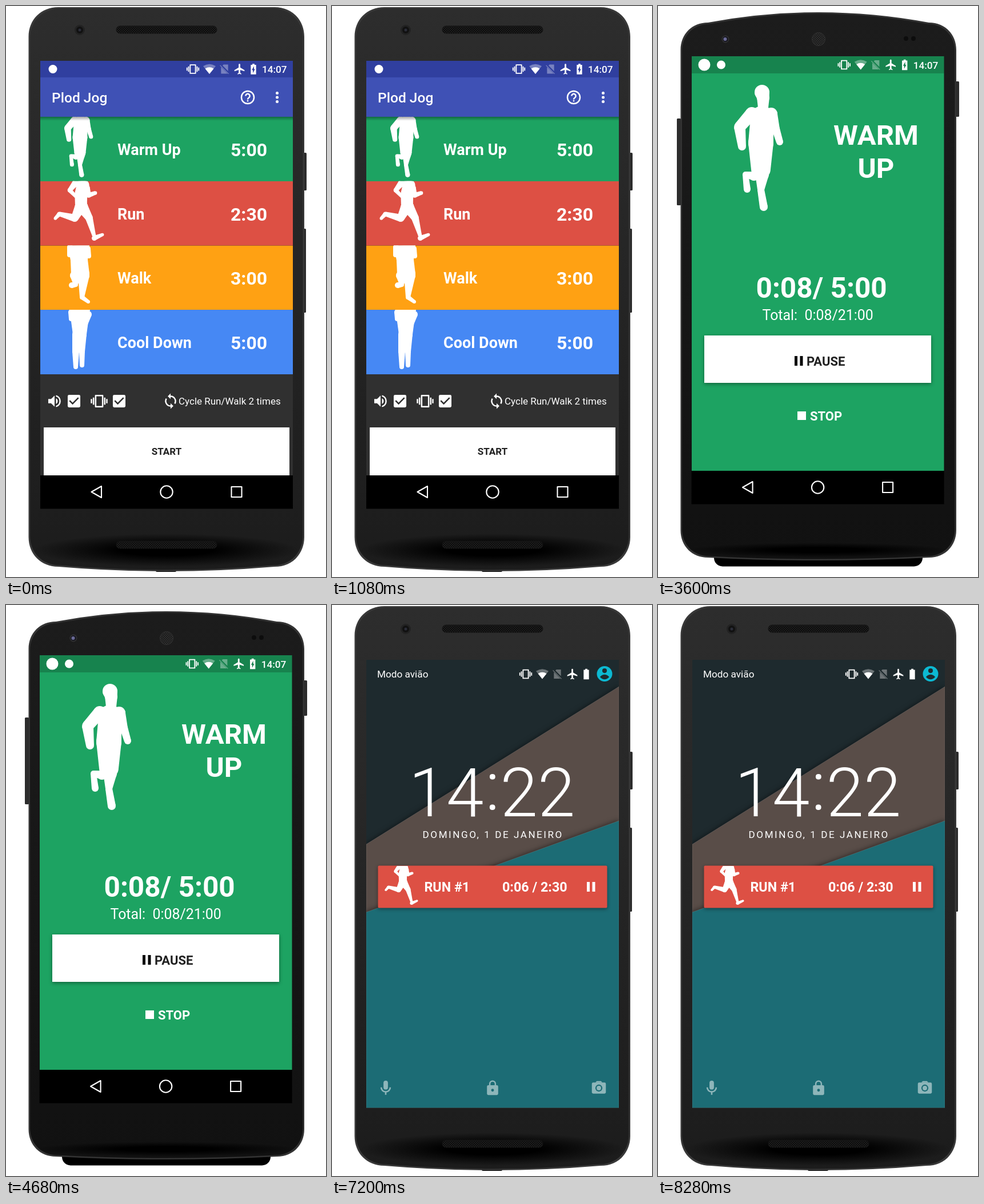
These frames come from a looping animation (560 by 1000 pixels, 9000 ms). An HTML page:

```html
<!DOCTYPE html>
<html lang="en">
<head>
<meta charset="utf-8">
<title>Interval timer screens</title>
<style>
  html, body { margin: 0; width: 100%; height: 100%; overflow: hidden; background: #fff; }
  #stage { display: block; width: 560px; height: 1000px; }
  text { font-family: Roboto, sans-serif; white-space: pre; }
  .lift { filter: drop-shadow(0 2px 3px rgba(0, 0, 0, .4)); }
  .cast { filter: drop-shadow(0 -1px 4px rgba(0, 0, 0, .5)); stroke: #fff; stroke-opacity: .12; }
</style>
</head>
<body>
<svg id="stage" viewBox="0 0 560 1000"></svg>
<script>
const SCENE_MS = 1800;
const GREEN = '#1da362', RED = '#dd5044', ORANGE = '#ffa113', BLUE = '#4688f4';
const PANEL = '#303030', NIGHT = '#1e2a2e', TEAL = '#1c6c75', INK = '#212121';
const DP = 1.226;

const rect = (x, y, w, h, fill, more = '') =>
  `<rect x="${x}" y="${y}" width="${w}" height="${h}" fill="${fill}" ${more}/>`;
const circle = (x, y, r, fill, more = '') => `<circle cx="${x}" cy="${y}" r="${r}" fill="${fill}" ${more}/>`;
const path = (d, fill, more = '') => `<path d="${d}" fill="${fill}" ${more}/>`;
const group = (transform, content, more = '') => `<g transform="${transform}" ${more}>${content}</g>`;
const move = (x, y, content) => group(`translate(${x} ${y})`, content);
const text = (x, y, size, weight, string, fill = '#fff', more = '') =>
  `<text x="${x}" y="${y}" font-size="${size}" font-weight="${weight}" fill="${fill}" ${more}>${string}</text>`;
const centred = (x, y, size, weight, string, fill) =>
  text(x, y, size, weight, string, fill, 'text-anchor="middle"');
const clipped = (x, y, w, h, content) =>
  `<svg x="${x}" y="${y}" width="${w}" height="${h}" viewBox="${x} ${y} ${w} ${h}">${content}</svg>`;

// Icons on a 24 x 24 grid, drawn in the group's colour
const solid = d => `<path d="${d}" stroke="none"/>`;
const line = (d, width = 2, more = '') => `<path d="${d}" fill="none" stroke-width="${width}" ${more}/>`;
const box = (x, y, w, h) => `<rect x="${x}" y="${y}" width="${w}" height="${h}" rx="2" stroke="none"/>`;
const dot = (x, y, r) => `<circle cx="${x}" cy="${y}" r="${r}" stroke="none"/>`;
const hole = (x, y, r, fill) => circle(x, y, r, fill, 'stroke="none"');

const ICONS = {
  volume: solid('M3 9h4l5-5v16l-5-5H3zM14 8a4.500 4.500 0 0 1 0 8z') + line('M14 4.300a8 8 0 0 1 0 15.400'),
  check: box(3, 3, 18, 18) + line('M5.700 11.300L10 15.600 18.300 7.300', 2, `stroke="${PANEL}"`),
  vibrate: line('M1 9v6M4 7v10M20 7v10M23 9v6M7 4h10v16H7z', 2, 'stroke-linejoin="round"'),
  cycle: line('M12 5a7 7 0 0 1 6 10.500M12 19a7 7 0 0 1-6-10.500') + solid('M12 1v8l-4-4zM12 23v-8l4 4z'),
  help: line('M3 12a9 9 0 0 1 18 0 9 9 0 0 1-18 0M9 10a3 3 0 1 1 4.500 2.600Q12 13.500 12 15') + solid('M11 16h2v2h-2z'),
  plane: solid('M21 16l-8-2.500V19l2 1.500V22l-3.500-1L8 22v-1.500l2-1.500v-5.500L2 16v-2l8-5V3.500a1.500 1.500 0 0 1 3 0V9l8 5z'),
  battery: solid('M7 4h3V2h4v2h3v18H7z'),
  bolt: solid('M11 20v-5.500H9L13 7v5.500h2z'),
  noSim: solid('M10 3h9v13L8 5zM5 8l13 13H5z') + line('M3 4.500L20 21.500', 1.5),
  account: dot(12, 12, 10) + hole(12, 8, 3, NIGHT) + path('M6 16q6-6 12 0-6 6.500-12 0z', NIGHT, 'stroke="none"'),
  mic: line('M12 5v6', 6, 'stroke-linecap="round"') + line('M5.900 11a6.100 6.100 0 0 0 12.200 0M12 17v4'),
  lock: box(4, 8, 16, 14) + line('M8 9V6a4 4 0 0 1 8 0v3') + hole(12, 15, 2, TEAL),
  camera: box(2, 4, 20, 16) + solid('M7 4l2-2h6l2 2z') + hole(12, 12, 5, TEAL) + dot(12, 12, 3.2)
};
const icon = (name, x, y, scale = DP, color = '#fff', more = '') =>
  group(`translate(${x} ${y}) scale(${scale}) translate(-12 -12)`, ICONS[name], `fill="${color}" stroke="${color}" ${more}`);

// A tapered limb through joints [x, y, radius]
const limb = (...joints) => joints.map(([x, y, r], i) => {
  if (!i) return circle(x, y, r, '#fff');
  const [px, py, pr] = joints[i - 1];
  const angle = Math.atan2(y - py, x - px);
  const nx = -Math.sin(angle), ny = Math.cos(angle);
  return circle(x, y, r, '#fff') + path(`M${px + nx * pr} ${py + ny * pr}L${x + nx * r} ${y + ny * r}` +
    `L${x - nx * r} ${y - ny * r}L${px - nx * pr} ${py - ny * pr}Z`, '#fff');
}).join('');

const FIGURES = {
  jog: limb([182, 151, 13], [184, 160, 11], [184, 178, 9]) +
    limb([182, 195, 20], [180, 240, 22], [180, 286, 17]) +
    limb([164, 188, 11], [143, 212, 10], [147, 246, 7]) +
    limb([198, 189, 11], [206, 215, 7], [213, 238, 6]) +
    limb([182, 295, 12], [180, 322, 6], [185, 352, 7]) +
    limb([168, 298, 8], [153, 295, 5], [156, 321, 6]),
  run: limb([194, 148, 14], [197, 154, 12], [188, 176, 10]) +
    limb([190, 188, 20], [184, 215, 20], [184, 247, 19]) +
    limb([168, 178, 11], [148, 203, 7], [168, 224, 5]) +
    limb([203, 195, 9], [208, 219, 8], [229, 212, 6]) +
    limb([187, 256, 19], [209, 290, 12], [225, 346, 6]) + limb([226, 356, 8], [252, 345, 5]) +
    limb([182, 256, 18], [164, 292, 12], [115, 279, 7], [102, 293, 5]),
  walk: limb([127, 419, 19], [128, 445, 15], [130, 470, 16]) +
    limb([112, 422, 5], [111, 436, 4]) + limb([144, 425, 4], [145, 438, 4]) +
    limb([136, 472, 10], [133, 510, 4], [144, 518, 3]) +
    limb([121, 472, 9], [122, 488, 4], [115, 489, 5]),
  cool: limb([129, 530, 18], [129, 575, 12]) +
    limb([114, 536, 5], [114, 548, 4]) + limb([144, 540, 6], [139, 557, 4]) +
    limb([124, 575, 8], [122, 605, 6], [122, 632, 4]) +
    limb([133, 575, 8], [133, 605, 5], [133, 629, 4])
};
const figure = (name, x = 0, y = 0, scale = 1) => group(`translate(${x} ${y}) scale(${scale})`, FIGURES[name]);

const gradient = (id, from, to) => `<linearGradient id="${id}" x2="0" y2="1">
  <stop stop-color="${from}"/><stop offset="1" stop-color="${to}"/></linearGradient>`;
const defs = `<defs>
  ${gradient('bodyA', '#2d2d2d', '#1c1c1c') + gradient('bodyB', '#1c1c1c', '#111')}
  ${gradient('shade', 'rgba(0,0,0,.35)', 'rgba(0,0,0,0)')}
  <radialGradient id="dusk"><stop offset=".35"/><stop offset="1" stop-opacity="0"/></radialGradient>
  <pattern id="mesh" width="4" height="4" patternUnits="userSpaceOnUse">${circle(1, 1, 1, '#333') + circle(3, 3, 1, '#333')}</pattern>
</defs>`;

// Rounded phone outline whose top and bottom edges bow outwards
const outline = (top, bottom, corner, bowTop, bowBottom, inset) => {
  const l = 39.5 + inset, r = 522 - inset, t = top + inset, b = bottom - inset, k = corner * .42;
  return `M${l} ${t + corner}C${l} ${t + k} ${l + k} ${t} ${l + corner} ${t}Q281 ${t - 2 * bowTop} ${r - corner} ${t}` +
    `C${r - k} ${t} ${r} ${t + k} ${r} ${t + corner}V${b - corner}C${r} ${b - k} ${r - k} ${b} ${r - corner} ${b}` +
    `Q281 ${b + 2 * bowBottom} ${l + corner} ${b}C${l + k} ${b} ${l} ${b - k} ${l} ${b - corner}Z`;
};
const body = (fill, rim, ...shape) => path(outline(...shape, 0), rim) + path(outline(...shape, 2.5), fill) +
  `<ellipse cx="281" cy="953" rx="232" ry="${shape[1] - 953}" fill="url(#dusk)"/>`;
const grille = y => rect(193, y, 176, 13, '#0c0c0c', 'rx="6.5" stroke="#111"') +
  rect(193, y, 176, 13, 'url(#mesh)', 'rx="6.5" opacity=".55"');
const sideKey = (x, y, h) => rect(x, y, 7, h, '#2c2c2c', 'rx="1.5"');

const phoneA = sideKey(519, 257, 66) + sideKey(518, 390, 147) + rect(262, 986, 36, 5, '#000', 'rx="2"') +
  body('url(#bodyA)', '#383838', 2, 982, 52, 0, 8) +
  circle(129, 42, 9, '#222') + circle(129, 42, 6, '#111') + circle(129, 42, 2.5, '#2b2d38') +
  grille(35) + grille(937);

const phoneB = sideKey(33, 197, 152) + sideKey(520, 132, 62) +
  rect(98, 950, 365, 31.5, '#000', 'rx="15"') +
  body('url(#bodyB)', '#333', 29, 966, 48, 18, 5) +
  circle(118, 58, 6.5, '#333') + circle(118, 58, 5, '#171720') + circle(117.5, 58, 3, '#6a6a96') +
  circle(281, 58, 11.5, '#1b1b1b') + circle(281, 58, 11.5, 'url(#mesh)', 'stroke="#333"') +
  circle(434, 57, 4, '#0d0d0d') + circle(447, 57, 4, '#0d0d0d');

const fan = (size, more) =>
  path(`M356 119l${-size} ${-size * 1.25}q${size} ${-size * .65} ${size * 2} 0z`, '#fff', more);
const statusIcons = boltColor =>
  icon('vibrate', 327, 110.5, .93) + fan(11, 'opacity=".35"') + fan(7.5) +
  icon('noSim', 382.5, 110.5, .88, '#fff', 'opacity=".35"') +
  icon('plane', 409, 110.5, .93) + icon('battery', 433, 110.5, .93) +
  (boltColor ? icon('bolt', 433, 110, .93, boltColor) : '');
const clock = time => text(448, 117, 17.2, 500, time);

const navigation = rect(60, 822, 442, 58.5, '#000') +
  `<g fill="none" stroke="#fff" stroke-width="2.1" stroke-linejoin="round">
    <path d="M167 841v20l-17.500-10zM394.500 842h18v18h-18z"/><circle cx="281" cy="851" r="10.700"/>
  </g>`;

const pauseBars = (x, y, color) => [0, 9.5].map(dx => rect(x + dx, y, 5, 17, color)).join('');

const rows = [
  ['Warm Up', '5:00', GREEN, figure('jog', 24, 89.6, .586)],
  ['Run', '2:30', RED, figure('run', 30.3, 211.1, .549)],
  ['Walk', '3:00', ORANGE, figure('walk')],
  ['Cool Down', '5:00', BLUE, figure('cool')]
].map(([label, length, color, runner], i) => {
  const top = 194 + i * 112.7;
  return clipped(60, top, 442, 113, rect(60, top, 442, 113, color) + runner) +
    text(195, top + 67, 27, 700, label) + text(393, top + 69, 32, 700, length);
}).join('');

const setup = rect(60, 96, 442, 726, PANEL) + rows + rect(60, 194, 442, 7, 'url(#shade)') +
  rect(60, 96, 442, 29.5, '#303f9f') + rect(60, 125, 442, 69, '#3f51b5') +
  text(80, 169, 24.5, 500, 'Plod Jog') + icon('help', 423, 160) +
  [-1, 0, 1].map(i => circle(474.5, 160 + i * 7.5, 2.5, '#fff')).join('') +
  icon('volume', 85, 692) + icon('check', 119, 692) + icon('vibrate', 163, 692) + icon('check', 198, 692) +
  icon('cycle', 288, 692) + text(302, 698, 17, 400, 'Cycle Run/Walk 2 times') +
  rect(66, 738, 430, 84, '#fff') + centred(281, 786, 17, 700, 'START', INK);

const setupScene = (boltColor, overlay = '') => phoneA + setup + overlay +
  circle(82, 110.5, 7.5, '#fff') + statusIcons(boltColor) + clock('14:07') + navigation;

const picker = (x, value, unit) =>
  rect(x, 430, 78.5, 2.4, '#fff') + rect(x, 491, 78.5, 2.4, '#fff') +
  centred(x + 39, 471, 24.5, 400, value) + text(x + 78.5, 469, 17.2, 400, unit) +
  `<g opacity=".45">${[-1, 1].map(i => centred(x + 39, 472.5 + i * 73.5, 16.5, 400, value + i)).join('')}</g>`;

const dialog = rect(60, 96, 442, 726, '#000', 'opacity=".6"') +
  rect(91, 296, 380, 355, RED, 'rx="2" class="lift"') +
  centred(281, 344, 27, 700, 'SET RUN LENGTH') +
  rect(159, 446, 14, 32, '#fff', 'opacity=".4"') +
  picker(127, 2, 'minutes') + picker(291.5, 30, 'seconds') +
  rect(110, 572, 341, 59, '#fff') + centred(281, 608, 17.2, 500, 'OK', INK);

const workout = (color, boltColor, runner, title, elapsed, total, time) =>
  phoneB + rect(59, 88, 441.5, 726, color) + rect(59, 88, 441.5, 30, '#000', 'opacity=".2"') +
  circle(81, 103, 10.5, '#fff') + circle(110.5, 103, 7.5, '#fff') +
  move(-1.3, -7.5, statusIcons(boltColor) + clock(time)) + figure(runner) + title +
  text(171.5, 511, 49.5, 700, elapsed) + text(182.5, 550, 24.9, 400, 'Total:  ' + total) +
  rect(81, 577, 397, 83, '#fff', 'class="lift"') + pauseBars(239, 613, '#000') + text(260, 630, 22, 700, 'PAUSE', INK) +
  rect(244, 710, 15, 15, '#fff') + text(266, 726, 22, 700, 'STOP') +
  move(-1.4, -8, navigation);

const slope = (left, right, color) => path(`M60 ${left}L502 ${right}V900H60Z`, color, 'class="cast"');
const lockScreen = phoneA +
  clipped(60, 96, 442, 784.5, rect(60, 96, 442, 785, NIGHT) + slope(419, 143, '#594d48') + slope(538, 378, TEAL)) +
  text(79, 126.5, 17.2, 400, 'Modo avião') + move(12, 10.5, statusIcons()) +
  icon('account', 477, 120.5, 1.35, '#0cb9d2') +
  centred(200, 370, 118, 300, '14') + centred(281, 358, 118, 300, ':') + centred(360, 370, 118, 300, '22') +
  text(158.6, 408, 17.1, 400, 'DOMINGO, 1 DE JANEIRO', '#fff', 'letter-spacing="2.53"') +
  rect(80.5, 456.5, 401, 74, RED, 'rx="2" class="lift"') +
  clipped(80, 457, 402, 74, figure('run', 57, 392.5, .364)) +
  text(161.5, 502, 23.3, 700, 'RUN #1') + text(298, 502, 23.3, 700, '0:06 / 2:30') + pauseBars(446, 485, '#fff') +
  icon('mic', 94, 846, 1.3, '#fff', 'opacity=".5"') + icon('lock', 281, 846, DP, '#fff', 'opacity=".5"') +
  icon('camera', 467, 846, DP, '#fff', 'opacity=".5"');

const scenes = [
  setupScene('#303f9f'),
  setupScene('#131940', dialog),
  workout(GREEN, '#17824e', 'jog', centred(381.5, 243, 49, 700, 'WARM') + centred(381.5, 301, 49, 700, 'UP'),
    '0:08/ 5:00', '0:08/21:00', '14:07'),
  workout(RED, '#b14036', 'run', centred(379.5, 272, 49, 700, 'RUN #1'), '0:15/ 2:30', '0:16/16:01', '14:08'),
  lockScreen
];

const stage = document.getElementById('stage');
stage.innerHTML = defs + scenes.map(scene => `<g class="scene">${scene}</g>`).join('');
const layers = [...stage.querySelectorAll('.scene')];

function render() {
  const current = Math.floor(performance.now() / SCENE_MS) % layers.length;
  layers.forEach((layer, i) => { layer.style.display = i === current ? '' : 'none'; });
  requestAnimationFrame(render);
}
render();
</script>
</body>
</html>
```
